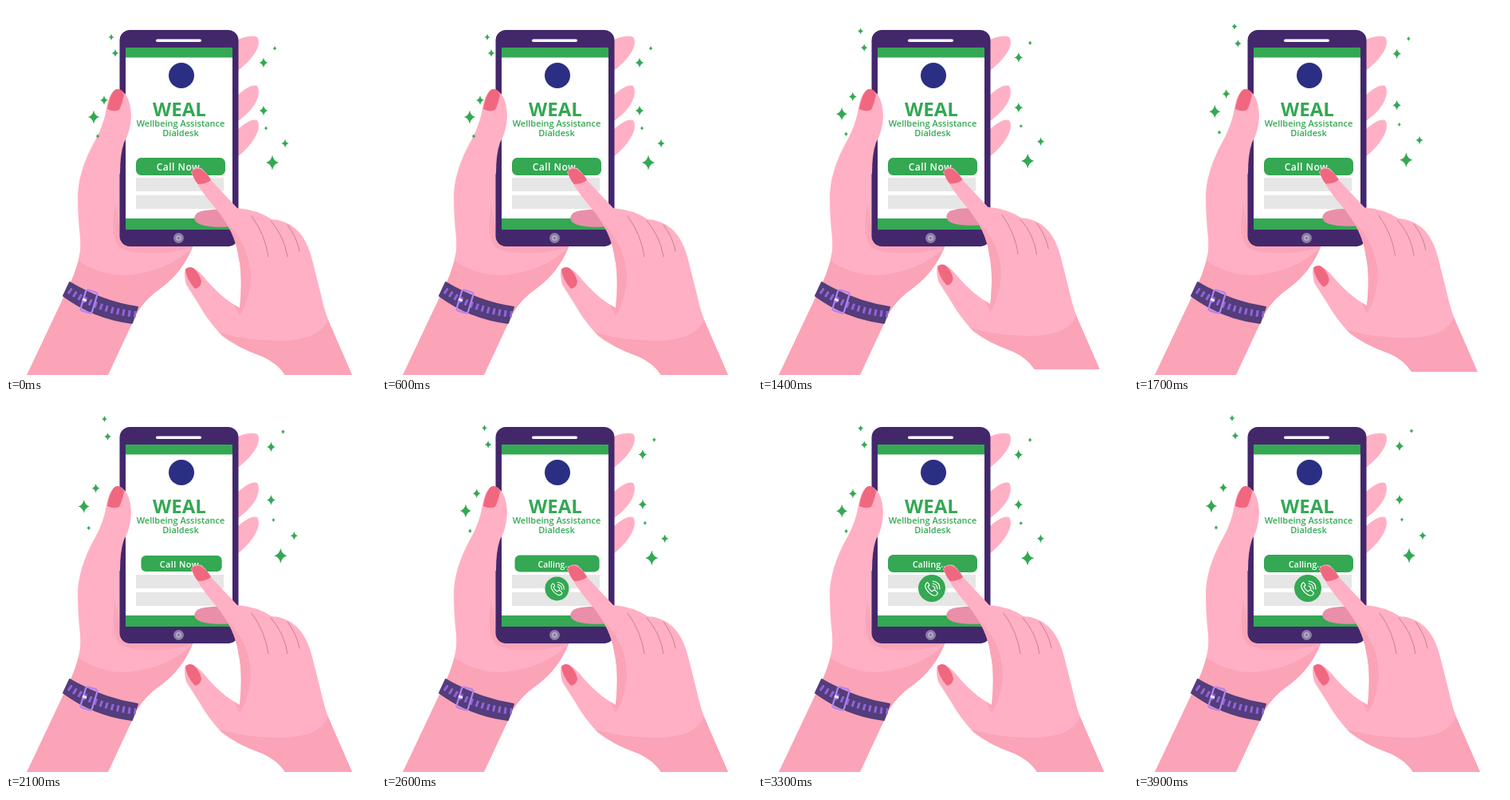
An HTML page that plays this animation: 464x462 px, repeating every 4000 ms.

```html
<!DOCTYPE html>
<html lang="en">
<head>
<meta charset="utf-8">
<style>
html, body { margin: 0; width: 100%; height: 100%; overflow: hidden; background: #fff; }
svg { display: block; width: 100vw; height: 100vh; }
text { font-family: "Open Sans", "Noto Sans", sans-serif; font-weight: 600; text-anchor: middle; }
.light { fill: #ffb0c4; }
.mid { fill: #fba3b7; }
.nail { fill: #f0687f; }
.green { fill: #34a853; }
.crease { fill: none; stroke: #c9808f; stroke-width: 1; stroke-linecap: round; }
</style>
</head>
<body>
<svg viewBox="0 0 464 462">
  <!-- fingers behind the phone -->
  <path class="light" d="M285 45 Q304 35 315 39 Q320 46 312 59 Q304 72 285 85Z
    M285 117 Q305 97 315 100 Q320 108 312 123 Q304 136 285 148Z
    M285 160 Q305 140 315 143 Q320 151 312 165 Q304 179 285 193Z"/>

  <!-- holding arm and palm -->
  <path class="mid" d="M26 462 L72 365 Q88 335 93 308 L234 302 Q222 332 196 352 Q174 367 164 385 L128 462Z"/>
  <path class="light" d="M126 130 Q121 152 112 168 Q91 205 90 237 Q90 265 93 290 Q94 308 91 319
    Q118 338 152 337 Q204 332 234 302 L234 200 L150 150Z"/>
  <path class="mid" d="M137 248 Q130 290 143 303 Q180 317 234 302 L234 280 L143 280Z" opacity=".8"/>

  <!-- wrist strap -->
  <path fill="#533d7b" stroke="#533d7b" stroke-width="2" stroke-linejoin="round" d="M80 346 Q120 370 165 377 L158 397 Q110 391 72 363Z"/>
  <path fill="none" stroke="#9264d8" stroke-width="8" stroke-dasharray="3 4.3" d="M79 356 Q115 381 163 386"/>
  <rect x="-7.500" y="-13.500" width="15" height="27" rx="3" fill="none" stroke="#b083f5" stroke-width="2.200" transform="translate(104 370) rotate(17)"/>
  <path stroke="#f3ebff" stroke-width="3" d="M96 367 L101 369"/>

  <!-- phone -->
  <rect x="142.500" y="30" width="149" height="271" rx="13" fill="#43276b"/>
  <rect x="188" y="41.500" width="57" height="3.400" rx="1.700" fill="#fff"/>
  <rect x="150" y="52" width="134" height="228" fill="#fff"/>
  <path class="green" d="M150 52h134v12.500h-134z M150 266h134v14h-134z"/>
  <circle cx="216.500" cy="290.500" r="6.500" fill="#8b7da5"/>
  <rect x="214" y="288" width="5" height="5" rx="1" fill="none" stroke="#d5cbe2"/>
  <circle cx="220" cy="87" r="16" fill="#2b2f83"/>
  <text class="green" x="217.500" y="138" font-size="24" style="font-weight:700">WEAL</text>
  <text class="green" x="219" y="151" font-size="11">Wellbeing Assistance</text>
  <text class="green" x="219" y="162.500" font-size="11">Dialdesk</text>
  <path fill="#e6e6e6" d="M163 215h110v17h-110z M163 237h110v17h-110z"/>
  <g id="button">
    <rect class="green" x="163" y="190" width="112" height="22" rx="6.500"/>
    <text id="label" x="216" y="206" font-size="12" fill="#fff"></text>
  </g>
  <g id="callIcon">
    <circle class="green" cx="218" cy="232" r="17"/>
    <g fill="none" stroke="#fff" stroke-width="1.200" stroke-linecap="round" stroke-linejoin="round" transform="translate(218 232)">
      <path d="M-7 -6 Q-9 -4 -8 -1 Q-5 6 2 9 Q5 10 7 7 Q8 6 6 4 L3 2 L0 4 Q-3 2 -5 -2 L-3 -4 L-5 -7 Q-6 -8 -7 -6Z"/>
      <path d="M1 -3 Q4 -2 4 1 M1 -6 Q7 -5 7 1 M1 -9 Q10 -8 10 1"/>
    </g>
  </g>

  <!-- thumb over the phone edge -->
  <path class="light" d="M125 133 Q129 107 139 104 Q156 107 157 138 Q156 158 148 171 Q143 185 143 210 L118 210Z"/>
  <path class="nail" d="M127 129 Q131 106 139 104 Q147 104 148 111 Q146 122 142 130 Q135 133 127 129Z"/>

  <g id="sparkles" class="green"></g>

  <!-- tapping hand -->
  <g id="hand">
    <path fill="#ea8fa9" d="M290 255 Q250 253 240 259 Q233 265 239 271 Q250 279 290 276Z"/>
    <path class="light" d="M232 208 Q236 201 245 203 Q253 210 258 219 L290 253 Q315 255 333 267 Q350 268 362 278
      Q377 290 384 318 Q391 345 396 366 Q401 388 410 407 L434 462 L350 462 Q340 447 322 439 Q290 428 271 413
      Q253 394 242 374 L226 349 Q222 332 226 328 Q236 325 247 338 Q270 366 293 378 Q297 340 292 316
      Q288 282 260 250 Q241 228 232 208Z"/>
    <path class="mid" d="M266 408 Q295 418 340 419 Q392 420 404 393 L410 407 L434 462 L350 462 Q340 447 322 439 Q290 428 266 408Z"/>
    <path class="mid" d="M277 272 Q306 300 307 340 Q305 370 293 388 L286 374 L293 378 Q297 340 292 316 Q288 290 277 272Z"/>
    <path class="nail" d="M233 207 Q237 202 244 204 Q253 210 257 218 Q251 223 241 223 Q235 217 233 207Z
      M225 330 Q229 325 235 328 Q243 335 245 345 Q244 353 237 354 Q226 342 225 330Z"/>
    <path class="crease" d="M308 263 Q325 286 329 314 M332 269 Q349 288 353 314 M353 274 Q365 290 368 307"/>
  </g>
</svg>
<script>
const $ = id => document.getElementById(id);
const clamp = v => Math.max(0, Math.min(1, v));

// x, y, drift x, drift y, radius
const sparkles = [
  [132, 39, -9, -20, 4], [137, 59, -10, -18, 5], [123, 118, -11, -12, 6],
  [110, 139, -13, -10, 8.5], [115, 163, -12, -7, 3],
  [337, 53, 11, -18, 3], [323, 71, 10, -17, 6.5], [323, 131, 10, -10, 6.5],
  [326, 153, 10, -7, 2.7], [350, 172, 12, -6, 5.5], [334, 196, 11, -5, 9.5]
];
$("sparkles").innerHTML = sparkles.map(() =>
  '<path d="M0 -1 Q.15 -.18 .85 0 Q.15 .18 0 1 Q-.15 .18 -.85 0 Q-.15 -.18 0 -1Z"/>').join("");
const stars = [...$("sparkles").children];

// Keyframes are [time, value] pairs, joined linearly.
function track(t, keys) {
  for (let i = 1; i < keys.length; i++) {
    const [t0, v0] = keys[i - 1], [t1, v1] = keys[i];
    if (t < t1) return v0 + (v1 - v0) * clamp((t - t0) / (t1 - t0));
  }
  return keys.at(-1)[1];
}

const driftKeys = [[0, 0], [300, .2], [600, 0], [1000, 0], [2050, 1], [2950, 0], [3900, 1]];
const handKeys = [[900, 1], [1100, .96], [2100, 1]];
const buttonKeys = [[1900, 1], [2150, .88], [2950, 1]];
const iconKeys = [[2300, 0], [2640, 1]];

function scaleAt(id, x, y, s) {
  $(id).setAttribute("transform", `translate(${x} ${y}) scale(${s}) translate(${-x} ${-y})`);
}

function draw(t) {
  const drift = track(t, driftKeys);
  sparkles.forEach(([x, y, dx, dy, r], i) =>
    stars[i].setAttribute("transform", `translate(${x + dx * drift} ${y + dy * drift}) scale(${r})`));
  scaleAt("hand", 233, 205, track(t, handKeys));
  scaleAt("button", 230, 201, track(t, buttonKeys));
  scaleAt("callIcon", 230, 236, track(t, iconKeys));
  const calling = t >= 2300;
  $("label").textContent = calling ? "Calling..." : "Call Now";
  $("label").setAttribute("font-size", calling ? 11 : 12);
  $("label").setAttribute("letter-spacing", calling ? 0 : .5);
}

const start = performance.now();
function tick() {
  const t = (performance.now() - start) % 4000;
  draw(Math.floor(t / 100) * 100);
  requestAnimationFrame(tick);
}
tick();
</script>
</body>
</html>
```
